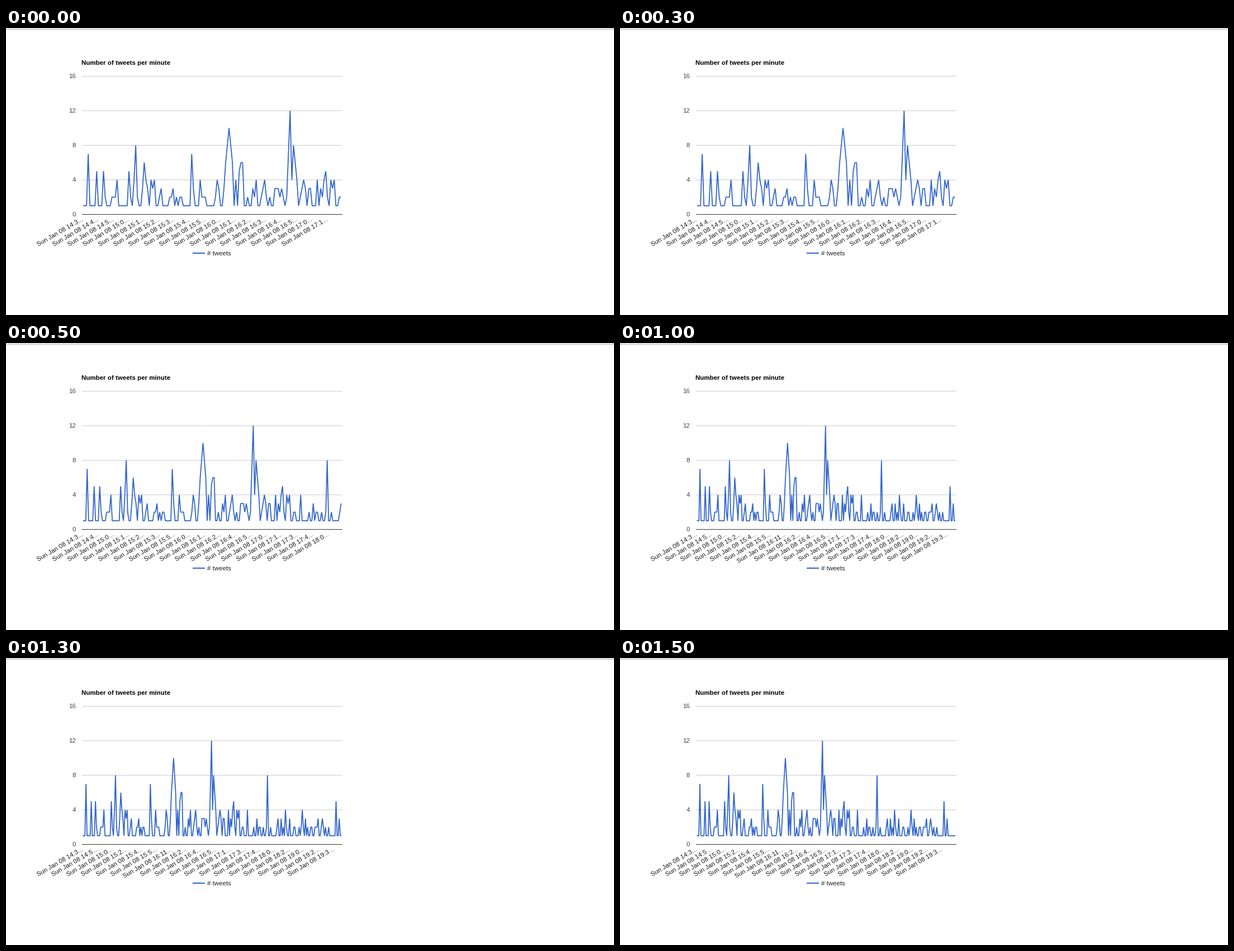
A matplotlib script that plays this animation: 1088x515 px, repeating every 2000 ms.

```python
import matplotlib.pyplot as plt
import numpy as np
from matplotlib.animation import FuncAnimation
from matplotlib.patches import Rectangle

WIDTH, HEIGHT, DPI = 1088, 515, 100
LEFT, RIGHT, BASE, UNIT = 136.5, 601, 334.5, 15.5
BLUE, FONT = "#3366cc", 11.5
PT = 72 / DPI
SHOWN = (153, 186, 246, 252)  # points on the chart at each refresh
MAX_LABELS = 18

# Peak position, height, steepness before and after.
BURSTS = [
    (3, 7, 6, 6), (8, 5, 4, 4), (12, 5, 4, 3), (27, 5, 4, 3), (31, 8, 4, 6),
    (36, 6, 3, 1.5), (64, 7, 6, 4), (86, 10, 2, 2), (94, 6, 0.5, 5),
    (122, 12, 5, 8), (124, 8, 4, 2), (143, 5, 1.5, 3), (175, 8, 6, 7),
    (240, 5, 4, 4),
]


def make_counts(total, seed=8):
    """Random chatter, quieter in the later part, with bursts on top."""
    rng = np.random.default_rng(seed)
    chance_of_one = np.where(np.arange(total) < 150, 0.45, 0.62)
    chatter = np.minimum(rng.geometric(chance_of_one), 4)
    bursts = np.zeros(total)
    offset = np.arange(-2, 3)
    for peak, height, rise, fall in BURSTS:
        shape = height - np.abs(offset) * np.where(offset < 0, rise, fall)
        span = peak + offset
        bursts[span] = np.maximum(bursts[span], np.maximum(shape.round(), 1))
    counts = np.where(bursts > 0, bursts, chatter)
    counts[-7:] = 1
    return counts


def time_label(index):
    """Clock time of a point, cut short; a narrow 11 leaves room for it all."""
    pauses = 5 * (index > 170) + 26 * (index > 200)
    hours, minutes = divmod(int(36.75 + 1.13 * index + pauses), 60)
    clock = f"{14 + hours}:{minutes:02d}"
    return f"Sun Jan 08 {clock if minutes == 11 else clock[:-1]}..."


plt.rcParams["font.family"] = "Liberation Sans"
fig = plt.figure(figsize=(WIDTH / DPI, HEIGHT / DPI), dpi=DPI,
                 facecolor="white")
ax = fig.add_axes([0, 0, 1, 1])
ax.set(xlim=(0, WIDTH), ylim=(HEIGHT, 0))
ax.axis("off")


def write(x, y, text, color="#222222", **style):
    return ax.text(x, y, text, color=color, fontsize=FONT * PT,
                   va="baseline", **style)


def stroke(xs, ys, color, width):
    return ax.plot(xs, ys, color=color, lw=width * PT, snap=False,
                   solid_capstyle="butt", solid_joinstyle="bevel")[0]


ax.add_patch(Rectangle((0, 1), WIDTH, 1.6, color="#cccccc", lw=0))
write(135, 66, "Number of tweets per minute", "black", weight="bold")
for tick in range(0, 17, 4):
    y = BASE - tick * UNIT
    stroke([136, 602], [y, y], "#cccccc" if tick else "#333333", 1)
    write(125, y + 4, str(tick), "#444444", ha="right")
stroke([334, 356], [404, 404], BLUE, 2)
write(360, 408, "# tweets")

counts = make_counts(max(SHOWN))
line = stroke([], [], BLUE, 1.8)
labels = [write(0, 345.5, "", ha="right", rotation=30, rotation_mode="anchor")
          for _ in range(MAX_LABELS)]


def update(frame):
    shown = SHOWN[frame]
    gap = -(-shown // MAX_LABELS)
    xs = LEFT + (np.arange(shown) + 0.5) * (RIGHT - LEFT) / shown
    line.set_data(xs, BASE - counts[:shown] * UNIT)
    for slot, label in enumerate(labels):
        index = slot * gap
        visible = index < shown
        label.set_visible(visible)
        if visible:
            label.set_x(xs[index] + 1.2)
            label.set_text(time_label(index))
    return [line, *labels]


animation = FuncAnimation(fig, update, frames=len(SHOWN), interval=500,
                          repeat=True, repeat_delay=0)
plt.show()
```
